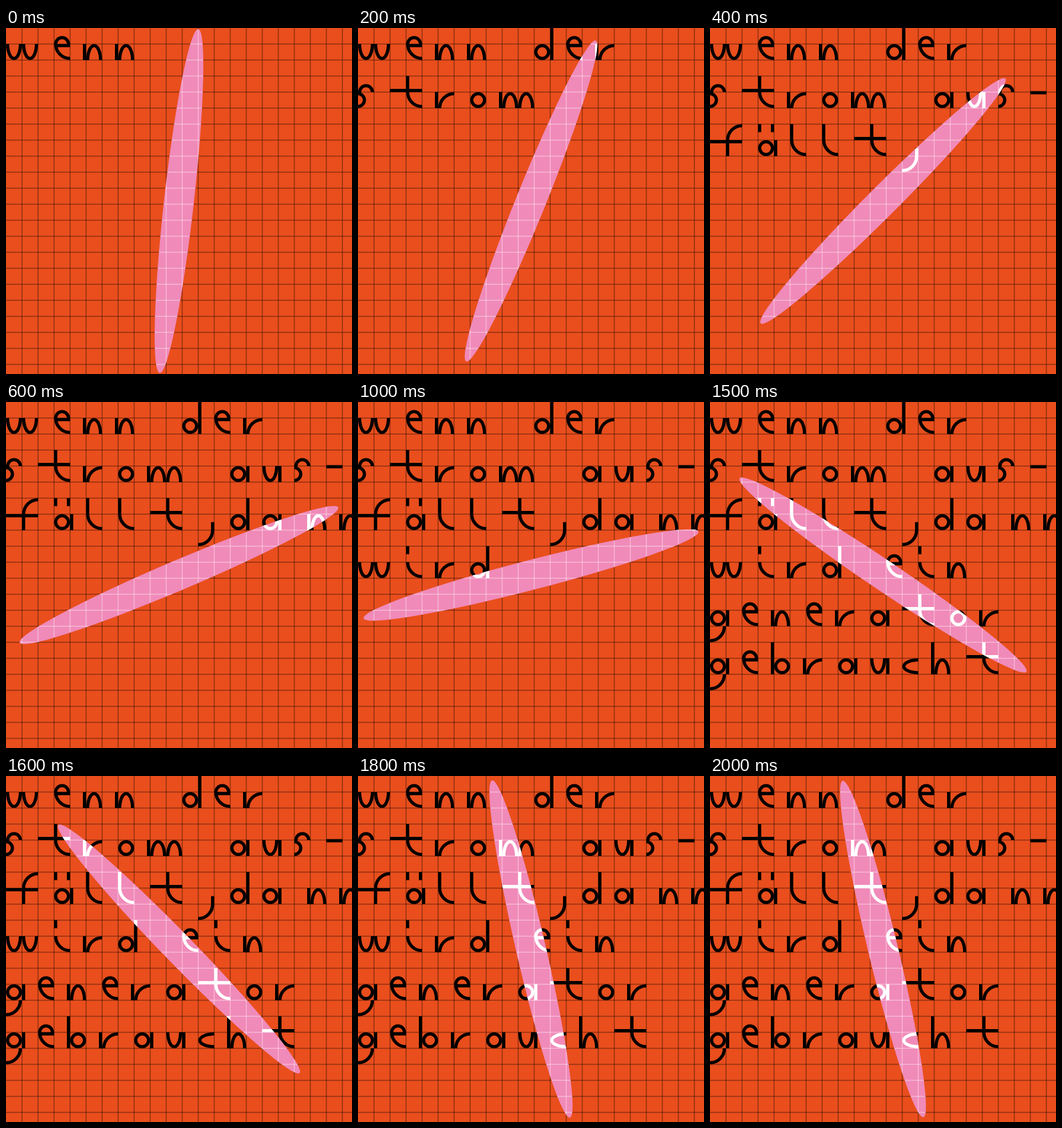
Animation, 540 px wide and 540 px high, one loop 2100 ms. Source, as an HTML page with a canvas:

```html
<!DOCTYPE html>
<html lang="de">
<head>
<meta charset="utf-8">
<style>
  html, body { margin: 0; width: 100%; height: 100%; overflow: hidden; background: #e94e1c; }
  canvas { display: block; width: 540px; height: 540px; }
</style>
</head>
<body>
<canvas id="stage" width="540" height="540" role="img"
  aria-label="wenn der strom ausfällt, dann wird ein generator gebraucht"></canvas>
<script>
const SIZE = 540, CELL = 25, STEP = 100, LOOP = 2100;
const ctx = document.getElementById('stage').getContext('2d');

// Modular lettering: origin at the left of the cell, on the baseline.
const bowl = 'M2.5 -12.5a10 10 0 1 0 20 0a10 10 0 1 0 -20 0';
const arch = 'M2.5 0a10 22.5 0 0 1 20 0';
const cup = 'M2.5 -25a10 22.5 0 0 0 20 0';
const foot = 'a22.5 22.5 0 0 0 22.5 22.5';
const stem = (x, height) => `M${x} 0v${-height}`;
const dot = x => `M${x} -50v12.5`;
const a = bowl + stem(27.5, 25);
const n = stem(-2.5, 25) + arch;

const glyphs = {
  a, n,
  'ä': a + dot(2.5) + dot(22.5),
  b: stem(-2.5, 50) + bowl,
  c: 'M25 -22.5a22.5 10 0 0 0 0 20',
  d: bowl + stem(27.5, 50),
  e: 'M25 -2.5a22.5 22.5 0 0 1 -22.5 -22.5a10 10 0 0 1 20 0v2.5h-20',
  f: 'M27.5 0v-25a22.5 22.5 0 0 1 22.5 -22.5M0 -22.5h50',
  g: a + 'M22.5 0a22.5 22.5 0 0 1 -22.5 22.5',
  h: stem(-2.5, 50) + arch,
  i: dot(2.5) + 'M2.5 -25' + foot,
  l: 'M2.5 -50v25' + foot,
  m: n + 'M27.5 0a10 22.5 0 0 1 20 0',
  o: bowl,
  r: stem(-2.5, 25) + 'M2.5 0a22.5 22.5 0 0 1 22.5 -22.5',
  s: 'M22.5 -25a10 10 0 0 0 -20 0v5M0 -22.5a10 10 0 0 1 0 20',
  t: 'M27.5 -50v25' + foot + 'M0 -27.5h50',
  u: cup + stem(27.5, 25),
  w: cup + 'M27.5 -25a10 22.5 0 0 0 20 0',
  ',': 'M22.5 -12.5v12.5a22.5 22.5 0 0 1 -22.5 22.5',
  '-': 'M0 -24h25'
};

function wordPath(text, x, baseline) {
  const path = new Path2D();
  for (const ch of text) {
    if (glyphs[ch]) path.addPath(new Path2D(glyphs[ch]), new DOMMatrix([1, 0, 0, 1, x, baseline]));
    x += CELL * (ch === ' ' ? 1 : 'wmtf'.includes(ch) ? 3 : 2);
  }
  return path;
}

// start time, row, left edge, text
const words = [
  [0, 0, 0, 'wenn'], [100, 0, 275, 'der'],
  [200, 1, 0, 'strom'], [300, 1, 350, 'aus-'],
  [400, 2, 0, 'fällt,'], [500, 2, 350, 'da nn'],
  [800, 3, 0, 'wird'], [1200, 3, 275, 'ein'],
  [1400, 4, 0, 'generator'], [1500, 5, 0, 'gebraucht']
].map(([start, row, x, text]) => ({ start, path: wordPath(text, x, 50 + row * 75) }));

const grid = new Path2D();
for (let p = CELL; p < SIZE; p += CELL) {
  grid.moveTo(p, 0);
  grid.lineTo(p, SIZE);
  grid.moveTo(0, p);
  grid.lineTo(SIZE, p);
}

// Clockwise tilt from upright, one value per step: two quarter turns with rests.
const tilt = [6.4, 13.5, 22, 33, 45, 57, 67, 72.5, 75, 75.4, 75.5,
  76.5, 81, 100, 112, 124, 135.8, 153, 167, 166.8, 166.5];

function layer(back, ink, gridAlpha, time) {
  ctx.fillStyle = back;
  ctx.fillRect(0, 0, SIZE, SIZE);
  ctx.strokeStyle = ink;
  ctx.lineWidth = 0.8;
  ctx.globalAlpha = gridAlpha;
  ctx.stroke(grid);
  ctx.globalAlpha = 1;
  ctx.lineWidth = 5;
  for (const word of words) if (time >= word.start) ctx.stroke(word.path);
}

function draw(now) {
  const step = Math.floor((now % LOOP) / STEP), time = step * STEP;
  layer('#e94e1c', '#000', 0.7, time);
  ctx.save();
  ctx.beginPath();
  ctx.ellipse(SIZE / 2, SIZE / 2, 23.3, 270, tilt[step] * Math.PI / 180, 0, 2 * Math.PI);
  ctx.clip();
  layer('#f08ab9', '#fff', 0.7, time);
  ctx.restore();
}

const begin = performance.now();
function tick() {
  draw(performance.now() - begin);
  requestAnimationFrame(tick);
}
tick();
</script>
</body>
</html>
```
